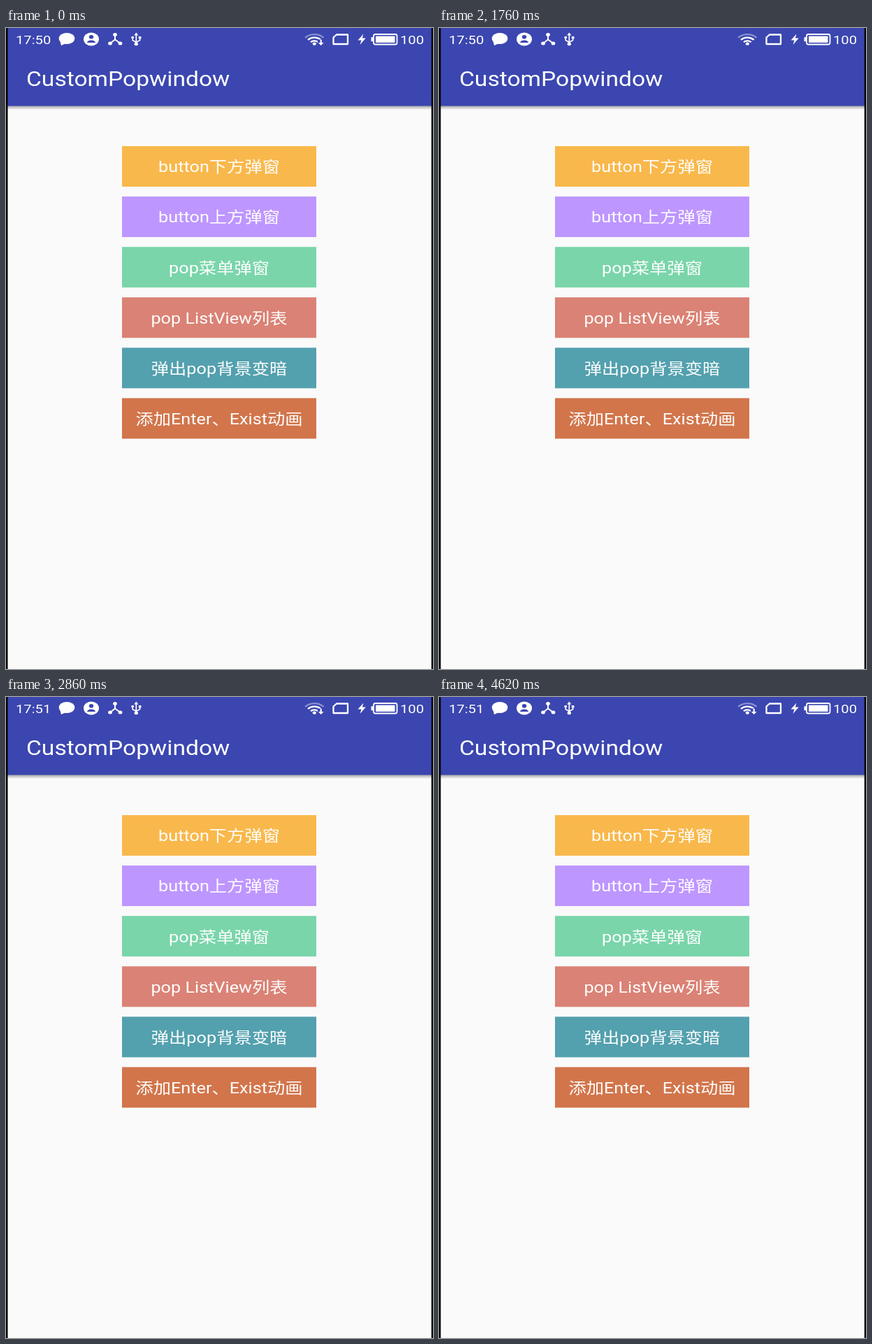
Write an HTML page with a canvas that moves like this. It is 611x917 px and loops after 4840 ms.

```html
<!DOCTYPE html>
<html lang="zh-CN">
<head>
<meta charset="utf-8">
<style>
  html, body { margin: 0; width: 611px; height: 917px; overflow: hidden; background: #fafafa; }
  canvas { display: block; }
</style>
</head>
<body>
<canvas id="stage" width="611" height="917"></canvas>
<script>
const ctx = document.getElementById('stage').getContext('2d');
const STEP = 220, LOOP = 4840;
const ASPECT = 1.175; // the phone screen is shown wider than tall
const FONT = 'Roboto, "Noto Sans CJK SC", "Noto Sans CJK", sans-serif';
const BLUE = '#3b46b0', PANEL = '#5b7482';
const LEFT = 166, WIDTH = 278, ROW = 86, LIST_TOP = 453;
const buttons = [
  ['button下方弹窗', '#f9b84b'],
  ['button上方弹窗', '#be96ff'],
  ['pop菜单弹窗', '#7ad5aa'],
  ['pop ListView列表', '#da8275'],
  ['弹出pop背景变暗', '#53a0ae'],
  ['添加Enter、Exist动画', '#d2754b']
];

const buttonTop = i => 169 + i * 72.1;

function rect(x, y, w, h, color) {
  ctx.fillStyle = color;
  ctx.fillRect(x, y, w, h);
}

function text(str, x, y, size, align = 'left') {
  ctx.save();
  ctx.translate(x, y);
  ctx.scale(ASPECT, 1);
  ctx.font = `${size}px ${FONT}`;
  ctx.textAlign = align;
  ctx.fillStyle = '#fff';
  ctx.fillText(str, 0, 0);
  ctx.restore();
}

function oval(x, y, rx, ry, color) {
  ctx.fillStyle = color;
  ctx.beginPath();
  ctx.ellipse(x, y, rx, ry, 0, 0, Math.PI * 2);
  ctx.fill();
}

function path(points, closed) {
  ctx.beginPath();
  points.forEach(([x, y]) => ctx.lineTo(x, y));
  if (closed) ctx.closePath();
}

function line(points, width, closed = false) {
  path(points, closed);
  ctx.strokeStyle = '#fff';
  ctx.lineWidth = width;
  ctx.stroke();
}

function shape(points, color = '#fff') {
  path(points, true);
  ctx.fillStyle = color;
  ctx.fill();
}

function wifi(loading) {
  ctx.save();
  ctx.translate(441.3, 24.5);
  ctx.scale(ASPECT, 1);
  ctx.lineWidth = 2.2;
  [6.2, 10.8, 15.4].forEach((r, i) => {
    ctx.strokeStyle = i === 2 ? 'rgba(255,255,255,.4)' : '#fff';
    ctx.beginPath();
    ctx.arc(0, 0, r, -Math.PI * 0.76, -Math.PI * 0.24);
    ctx.stroke();
  });
  ctx.restore();
  oval(441.3, 22.6, 2.6, 2.2, '#fff');
  if (loading) {
    rect(446, 16.5, 9, 9, BLUE);
    rect(449.6, 17, 2.2, 5, '#fff');
    shape([[446.8, 21], [454.6, 21], [450.7, 25]]);
  }
}

function statusBar(clock, loading) {
  text(clock, 14, 22.5, 17.2);

  oval(87, 15, 11.3, 8, '#fff');
  shape([[77, 17], [79, 25], [88, 21]]);

  oval(122, 16, 11, 9.4, '#fff');
  oval(122, 12.8, 3.2, 2.8, BLUE);
  ctx.fillStyle = BLUE;
  ctx.beginPath();
  ctx.ellipse(122, 21, 6, 3.6, 0, Math.PI, 0);
  ctx.fill();

  for (const [x, y] of [[156, 9.5], [149, 22], [163.5, 22]]) {
    line([[156, 16.5], [x, y]], 2);
    oval(x, y, 2.9, 2.5, '#fff');
  }

  line([[186.3, 9], [186.3, 23]], 1.7);
  shape([[183.2, 10.5], [186.3, 6.5], [189.4, 10.5]]);
  line([[181.2, 13.5], [181.2, 17.5], [186.3, 20.5], [191.6, 17.5], [191.6, 13.5]], 1.6);
  oval(181.2, 13.5, 2, 1.8, '#fff');
  rect(189.8, 12, 3.6, 3.4, '#fff');
  oval(186.3, 23, 2.7, 2.2, '#fff');

  wifi(loading);
  ctx.lineJoin = 'round';
  line([[473, 9.5], [489, 9.5], [489, 23], [468.5, 23], [468.5, 13.5]], 2.3, true);
  ctx.lineJoin = 'miter';
  shape([[511.5, 8.5], [503.5, 17.5], [508.5, 17.5], [506.5, 24], [514.8, 14.5], [509.8, 14.5]]);

  ctx.lineWidth = 1.8;
  ctx.strokeStyle = '#fff';
  ctx.beginPath();
  ctx.roundRect(526, 9, 33.5, 14.5, 2.5);
  ctx.stroke();
  rect(529, 11.6, 27.5, 9.3, '#fff');
  rect(522.5, 13.2, 2.7, 6, '#fff');
  text('100', 564, 22.5, 17.2);
}

function home(clock, loading) {
  rect(0, 0, 611, 917, '#fafafa');
  const shadow = ctx.createLinearGradient(0, 111, 0, 117);
  shadow.addColorStop(0, 'rgba(0,0,0,.36)');
  shadow.addColorStop(1, 'rgba(0,0,0,0)');
  rect(0, 111, 611, 6, shadow);
  rect(0, 0, 611, 111.5, BLUE);
  statusBar(clock, loading);
  text('CustomPopwindow', 29, 83, 28.6);
  buttons.forEach(([label, color], i) => {
    const y = buttonTop(i);
    rect(LEFT, y, WIDTH, 58, color);
    text(label, 305, y + 37.3, 21.5, 'center');
  });
}

function list(scroll) {
  ctx.save();
  ctx.beginPath();
  ctx.rect(0, LIST_TOP, 611, 917 - LIST_TOP);
  ctx.clip();
  rect(0, LIST_TOP, 611, 917 - LIST_TOP, PANEL);
  for (let i = 0; i < 9; i++) {
    text('Item:' + i, 305.5, LIST_TOP + i * ROW + 53.5 - scroll, 28.6, 'center');
  }
  ctx.restore();
}

function popup(top, height = 108, alpha = 1) {
  ctx.globalAlpha = alpha;
  rect(LEFT, top, WIDTH, height, PANEL);
  ctx.globalAlpha = 1;
}

function touch(x, y) {
  oval(x, y, 23, 19.5, 'rgba(190,200,235,.18)');
  oval(x, y, 20.5, 17.3, 'rgba(150,165,215,.4)');
  oval(x, y, 17.8, 14.8, 'rgba(230,232,234,.78)');
}

function dimmed() {
  rect(0, 0, 611, 917, 'rgba(0,0,0,.3)');
  popup(buttonTop(4) + 63);
}

const scenes = {
  1: () => popup(buttonTop(0) + 63),
  3: () => popup(buttonTop(1) - 108),
  5: () => popup(buttonTop(2) + 67, 265),
  7: () => list(0),
  9: () => list(0),
  10: () => { list(183); touch(447, 525); },
  12: dimmed,
  14: dimmed,
  15: () => touch(407, 568),
  17: () => popup(592, 108, 0.5),
  18: () => popup(592),
  19: () => popup(592),
  20: () => popup(592, 108, 0.5)
};

function draw(now) {
  const step = Math.floor((now % LOOP) / STEP);
  const quiet = (step >= 6 && step < 9) || (step >= 17 && step < 21);
  home(step < 11 ? '17:50' : '17:51', !quiet);
  scenes[step]?.();
  rect(0, 0, 2.5, 917, '#000');
  rect(608.7, 0, 2.3, 917, '#000');
}

let start;
function tick(now) {
  start ??= now;
  draw(now - start);
  requestAnimationFrame(tick);
}
draw(0);
requestAnimationFrame(tick);
</script>
</body>
</html>
```
